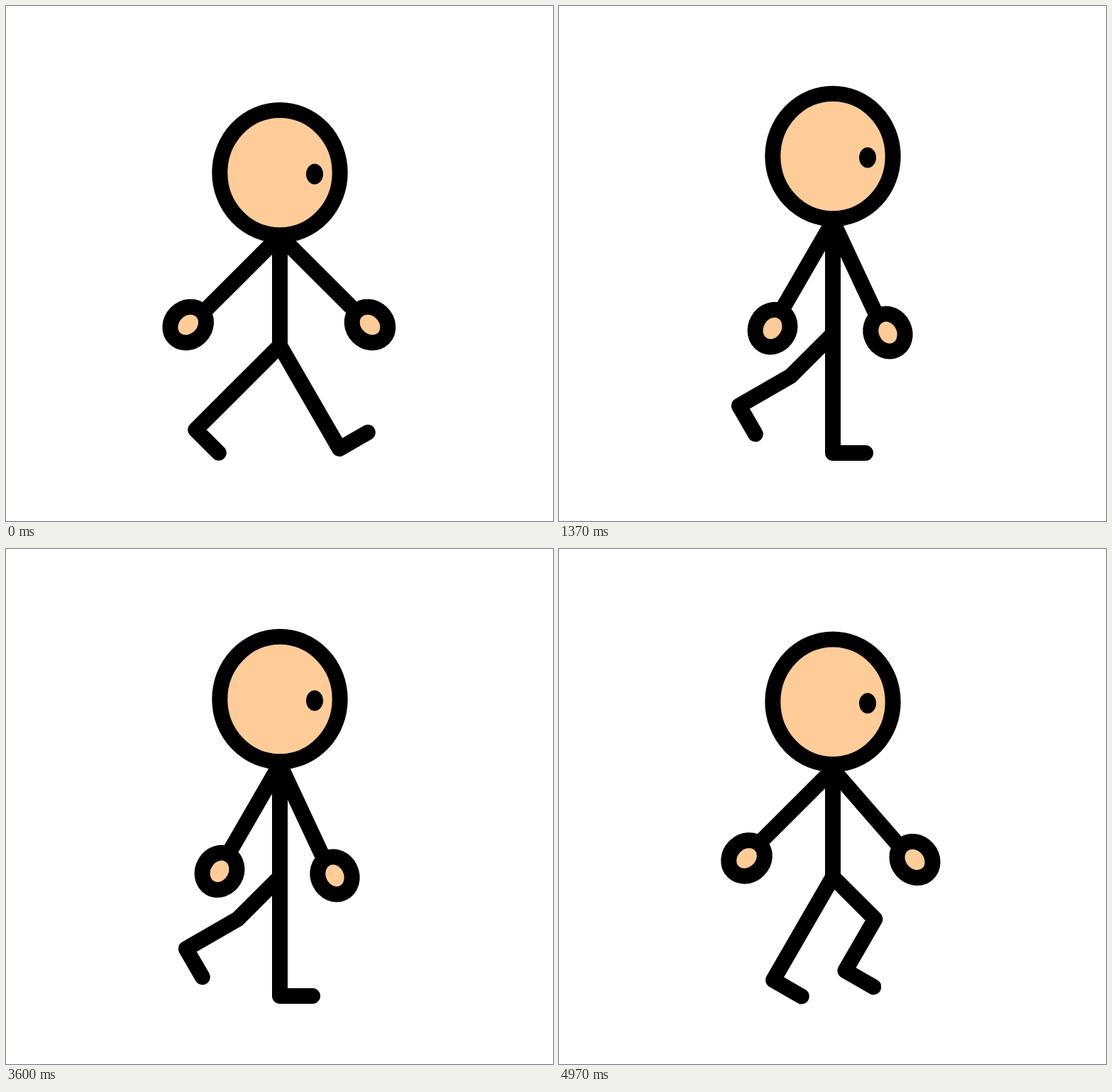
An HTML page with a canvas for the animation above (5.03 s loop, 771 px wide and 727 px high).

```html
<!DOCTYPE html>
<html lang="en">
<head>
<meta charset="utf-8">
<title>Walking stick figure</title>
<style>
  html, body { margin: 0; width: 100%; height: 100%; overflow: hidden; background: #fff; }
  canvas { display: block; }
</style>
</head>
<body>
<canvas id="stage" width="771" height="727"></canvas>
<script>
const ctx = document.getElementById('stage').getContext('2d');
const SKIN = '#fecc99', CENTER = 386, LIMB = 84, FOOT = 46, ARM = 150;
const LOOP = 5030;

// Heights of head centre, shoulder and hip; legs as [thigh, shin] degrees
// from vertical; arms as [degrees, hand x, hand y].
const poses = [
  { head: 235.2, shoulder: 324.5, hip: 479.5, legs: [[-45, -45], [30, 30]],     arms: [[-45, 256.7, 450], [45, 513, 450]] },
  { head: 226,   shoulder: 318,   hip: 473,   legs: [[-37.5, -45], [22.5, 17]], arms: [[-45, 260.5, 443], [43, 507, 444]] },
  { head: 217.5, shoulder: 311.5, hip: 466,   legs: [[-30, -45], [15, 5]],      arms: [[-45, 264.5, 436.5], [41, 501.5, 438.5]] },
  { head: 212,   shoulder: 304.5, hip: 463,   legs: [[-45, -60], [0, 0]],       arms: [[-30, 301, 455], [25, 463.5, 461]] },
  { head: 209,   shoulder: 302,   hip: 459,   legs: [[-15, -72], [-7.5, -7.5]], arms: [[-20, 328, 465], [16, 437, 469]] },
  { head: 206.5, shoulder: 304.5, hip: 457,   legs: [[15, -60], [-15, -15]],    arms: [[-30, 301, 455], [25, 463.5, 461]] },
  { head: 215.7, shoulder: 311.5, hip: 463,   legs: [[45, -30], [-30, -30]],    arms: [[-45, 264.5, 436.5], [41, 501.5, 438.5]] },
];

const rad = deg => deg * Math.PI / 180;

// Continues a polyline from (x, y) by [degrees from vertical, length] segments.
function limb(x, y, segments) {
  ctx.beginPath();
  ctx.moveTo(x, y);
  for (const [deg, length] of segments) {
    x += Math.sin(rad(deg)) * length;
    y += Math.cos(rad(deg)) * length;
    ctx.lineTo(x, y);
  }
  ctx.stroke();
}

function oval(x, y, rx, ry, fill, deg = 0) {
  ctx.beginPath();
  ctx.ellipse(x, y, rx, ry, rad(deg), 0, 2 * Math.PI);
  ctx.fillStyle = fill;
  ctx.fill();
}

function ring(x, y, rx, ry, deg) {
  oval(x, y, rx, ry, SKIN, deg);
  ctx.stroke();
}

function draw({ head, shoulder, hip, legs, arms }) {
  ctx.fillStyle = '#fff';
  ctx.fillRect(0, 0, 771, 727);
  ctx.strokeStyle = '#000';
  ctx.lineWidth = 22;
  ctx.lineCap = ctx.lineJoin = 'round';

  limb(CENTER, shoulder, [[0, hip - shoulder]]);
  for (const [thigh, shin] of legs) {
    limb(CENTER, hip, [[thigh, LIMB], [shin, LIMB], [shin + 90, FOOT]]);
  }
  for (const [deg, x, y] of arms) {
    limb(CENTER, shoulder, [[deg, ARM]]);
    ring(x, y, 23.5, 27, -deg);
  }
  ring(CENTER, head, 84.7, 88.3, 0);
  oval(435, head + 2, 12, 14.5, '#000');
}

// Steps run at 12.5 per second, snapped to ticks of 1/30 s.
function frame() {
  const tick = Math.floor((performance.now() % LOOP) * 0.03 + 0.15);
  const step = Math.min(Math.floor(tick * 5 / 12), 62);
  draw(poses[step % poses.length]);
  requestAnimationFrame(frame);
}
frame();
</script>
</body>
</html>
```
